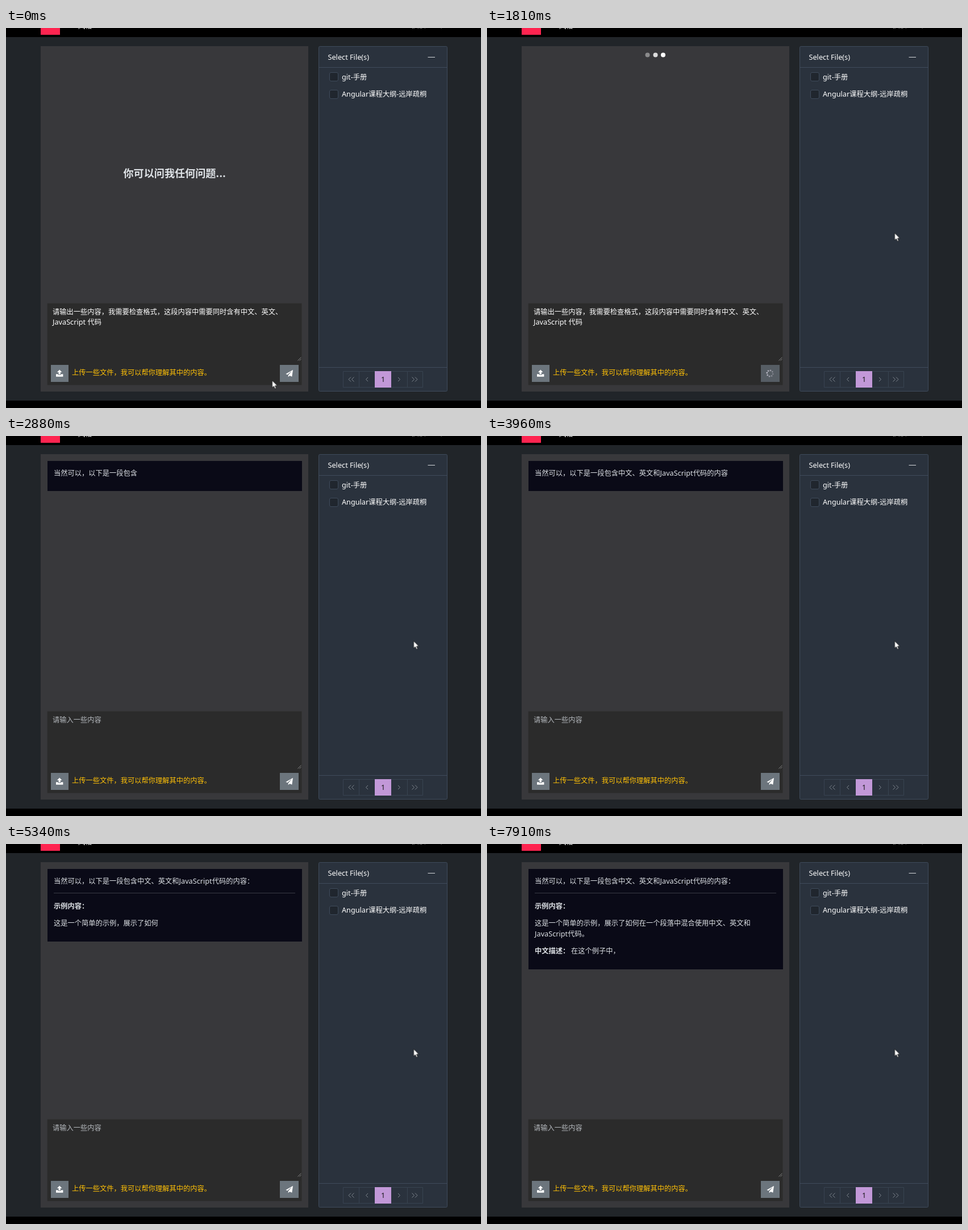
Animation, 836 px wide and 670 px high, one loop 8000 ms. Source, as an HTML page:

```html
<!DOCTYPE html>
<html lang="zh-CN">
<head>
<meta charset="utf-8">
<title>Chat</title>
<style>
html, body { margin: 0; width: 100%; height: 100%; overflow: hidden; background: #000; }
#stage {
  position: relative; width: 836px; height: 670px; overflow: hidden; color: #fff;
  font: 12.25px/18.375px "Noto Sans CJK SC", "Noto Sans CJK", "Noto Sans", sans-serif;
}
svg { position: absolute; left: 0; top: 0; }
i { font: 12.7px/0 "Noto Sans", "Open Sans", sans-serif; }
b i { font-weight: 700; }
i.star { font: 13px/0 "Liberation Sans", sans-serif; }
.t { position: absolute; white-space: pre; }
.title { left: 206.5px; top: 241px; font-size: 18.1px; line-height: 28px; font-weight: 700; color: #dee2e6; }

#reply {
  position: absolute; left: 72.75px; top: 43.6px; width: 447.75px; box-sizing: border-box;
  padding: 12.25px 11.3px 10.7px; background: #0a0a17; color: #dee2e6;
}
#reply p { position: relative; margin: 0 0 12.25px; }
#reply hr { height: 1px; margin: 0 0 12.25px; border: 0; background: #3a3c45; }

.idle, .asking, .busy, .answered { animation: 8s step-end infinite; }
.idle { animation-name: idle; }
.asking { animation-name: asking; }
.busy { animation-name: busy; }
.answered { animation-name: answered; }
@keyframes idle { 0% { opacity: 1 } 7.5%, 100% { opacity: 0 } }
@keyframes asking { 0% { opacity: 1 } 25.125%, 100% { opacity: 0 } }
@keyframes busy { 0% { opacity: 0 } 7.5% { opacity: 1 } 25.125%, 100% { opacity: 0 } }
@keyframes answered { 0% { opacity: 0 } 25.125%, 100% { opacity: 1 } }

.dot { animation: pulse 1s ease-in-out -.19s infinite; }
.dot:nth-child(1) { animation-delay: -.51s; }
.dot:nth-child(2) { animation-delay: -.35s; }
@keyframes pulse { 0%, 100% { opacity: 1 } 50% { opacity: .2 } }

#spinner { transform-origin: 498px 609px; animation: spin 2s linear infinite; }
@keyframes spin { to { transform: rotate(360deg) } }

#pointer { animation: point 8s linear infinite; }
@keyframes point {
  0%, .75% { transform: translate(468.5px, 621.5px); animation-timing-function: ease-out; }
  5.5%, 9.5% { transform: translate(496px, 608px); animation-timing-function: ease-in-out; }
  19%, 100% { transform: translate(717.5px, 361.5px); }
}
</style>
</head>
<body>
<div id="stage">
  <svg width="836" height="670" fill="none">
    <rect y="16" width="836" height="641" fill="#212529"/>
    <rect x="61" width="34" height="12" fill="#ff2450"/>
    <rect x="61" y="32" width="471" height="609" fill="#38383b"/>
    <rect x="72.75" y="485.5" width="447.75" height="144" fill="#2b2b2b"/>
    <path d="M513.5 586.5l6-6M516.5 586.5l3-3" stroke="#999" stroke-width=".8"/>

    <g fill="#6c757d">
      <rect x="79" y="594" width="31" height="30"/>
      <rect x="482" y="594" width="33" height="30"/>
    </g>
    <path d="M94.2 602.6l4.3 4.4h-2.7v3.8h-3.2V607h-2.7zM88 610.2h3.7v1.5h5v-1.5h3.7v4.6H88z" fill="#fff"/>
    <path d="M505 602.8L492.4 610l3 1.3 7.6-6.7-6.3 7.9v2.7l2.6-2.1 4 1.6z" fill="#fff"/>
    <g class="busy">
      <rect x="482" y="594" width="33" height="30" fill="#565d64"/>
      <g id="spinner"></g>
      <g fill="#fff">
        <circle class="dot" cx="282.5" cy="47.5" r="4"/>
        <circle class="dot" cx="296.5" cy="47.5" r="4"/>
        <circle class="dot" cx="310" cy="47.5" r="4"/>
      </g>
    </g>

    <g stroke="#3f4b5b">
      <rect x="550.5" y="32.5" width="226" height="608" rx="2" fill="#2a323d"/>
      <path d="M551 69.5H776M551 598.5H776"/>
      <rect x="569.5" y="78.5" width="15" height="15" rx="2.5" fill="#20262e"/>
      <rect x="569.5" y="109.5" width="15" height="15" rx="2.5" fill="#20262e"/>
    </g>
    <path d="M593.5 605.5h140v28h-140zM621.5 605v29M706.5 605v29" stroke="#384351"/>
    <rect x="649" y="605" width="29" height="29" fill="#c298d8"/>
    <path d="M742.5 51.5h12.5" stroke="#d5d8db"/>
    <path d="M607 615.5l-4 4 4 4M612.5 615.5l-4 4 4 4M637 616l-3.5 3.5 3.5 3.5M690 616l3.5 3.5-3.5 3.5M714.5 615.5l4 4-4 4M720 615.5l4 4-4 4" stroke="#7f868f"/>
  </svg>

  <div class="t" style="left:127px;top:-13.5px">风格</div>
  <div class="t" style="left:714px;top:-14px;color:#999">换肤</div>
  <div class="t" style="left:760px;top:-14px;color:#777">中</div>

  <div class="t title idle">你可以问我任何问题...</div>
  <div class="t asking" style="left:82px;top:491px">请输出一些内容，我需要检查格式，这段内容中需要同时含有中文、英文、
<i>JavaScript </i>代码</div>
  <div class="t answered" style="left:82px;top:491px;color:#b4b8bd">请输入一些内容</div>
  <div class="t" style="left:116px;top:598px;color:#ffc107">上传一些文件，我可以帮你理解其中的内容。</div>

  <div class="t" style="left:566.5px;top:41.5px"><i>Select File(s)</i></div>
  <div class="t" style="left:591px;top:77px"><i>git-</i>手册</div>
  <div class="t" style="left:591px;top:107px"><i>Angular</i>课程大纲<i>-</i>远岸疏桐</div>
  <div class="t" style="left:660px;top:610px;color:#151515"><i>1</i></div>

  <div id="reply"></div>

  <svg width="836" height="670">
    <path id="pointer" d="M0 0V12.6L2.9 10L4.9 14.6L7 13.7L5 9.2H9Z" fill="#fff" stroke="#111" stroke-width=".8"/>
  </svg>
</div>
<script>
const LOOP = 8000;
// Streamed markdown: arrival time in ms, then the chunk.
const chunks = [
  [2010, '当然'], [2210, '可以'], [2410, '，'], [2480, '以下'],
  [2630, '是'], [2750, '一段'], [2880, '包含'], [3010, '中文'], [3140, '、'],
  [3480, '英文'], [3600, '和'], [3750, 'JavaScript'], [3850, '代码'], [3960, '的内容'],
  [4150, '：'], [4280, '\n---\n**示例'], [4420, '内容'], [4540, '：'], [4680, '**\n这是一个'],
  [4820, '简单'], [4930, '的示例'], [5040, '，'], [5150, '展示了'], [5340, '如何'],
  [5480, '在一个'], [5620, '段落'], [5750, '中'], [5880, '混合'],
  [6030, '使用'], [6150, '中文'], [6280, '、'], [6480, '英文'], [6590, '和'],
  [6700, 'JavaScript'], [6910, '代码'], [6980, '。'],
  [7110, '\n**中文'], [7230, '描述'], [7350, '：'], [7500, '** 在这个'],
  [7630, '例子'], [7780, '中'], [7910, '，']
];

const inline = text => text
  .replace(/[A-Za-z]+/g, '<i>$&</i>')
  .replace(/\*\*(.+?)\*\*/g, '<b>$1</b>')
  .replace(/\*\*/g, '<i class="star">**</i>');

const toHtml = markdown => markdown.split('\n')
  .map(line => line === '---' ? '<hr>' : `<p>${inline(line)}</p>`).join('');

document.getElementById('spinner').innerHTML = Array.from({ length: 8 }, (_, k) => {
  const angle = k * Math.PI / 4;
  const x = 498 + 5.2 * Math.cos(angle), y = 609 + 5.2 * Math.sin(angle);
  const opacity = .7 - .3 * Math.cos(angle - Math.PI / 4);
  return `<circle cx="${x}" cy="${y}" r="1.2" fill="#d6d2e0" opacity="${opacity}"/>`;
}).join('');

const reply = document.getElementById('reply');
let start, shown = -1;

function draw(now) {
  start ??= now;
  const time = (now - start) % LOOP;
  const arrived = chunks.filter(([at]) => at <= time);
  if (arrived.length !== shown) {
    shown = arrived.length;
    reply.hidden = !shown;
    reply.innerHTML = toHtml(arrived.map(([, text]) => text).join(''));
  }
  requestAnimationFrame(draw);
}
reply.hidden = true;
requestAnimationFrame(draw);
</script>
</body>
</html>
```
